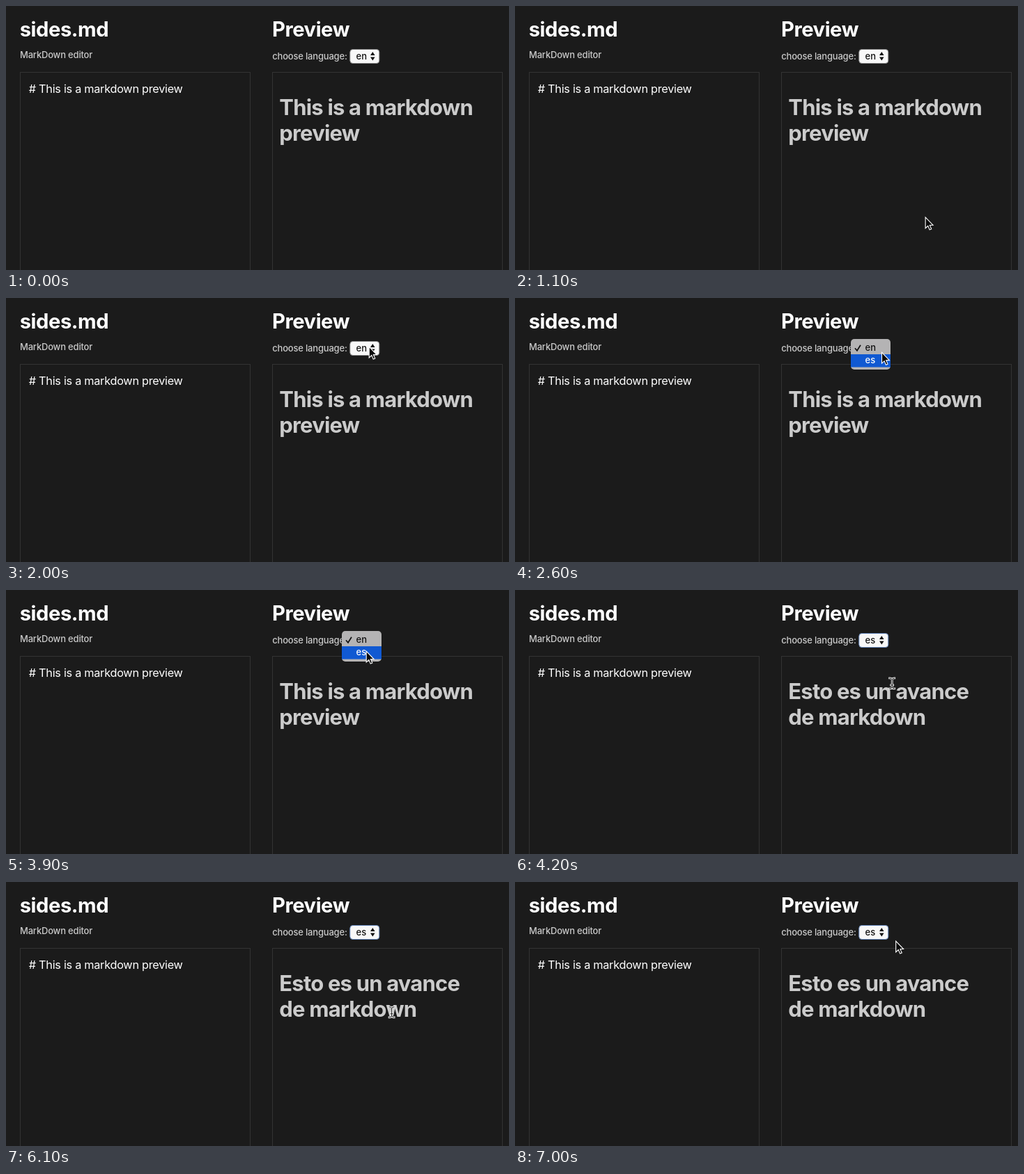
An HTML page for the animation above (7100 ms loop, 722 by 380 pixels).

```html
<!DOCTYPE html>
<html lang="en">
<head>
<meta charset="utf-8">
<title>Markdown preview</title>
<style>
html, body { margin: 0; width: 100%; height: 100%; overflow: hidden; background: #1b1b1b; }
svg { display: block; width: 722px; height: 380px; }
text { font-family: Inter, Roboto, sans-serif; font-optical-sizing: none; white-space: pre; }
.title { font-size: 29.2px; font-weight: 700; letter-spacing: -.45px; fill: #fff; }
.small { font-size: 13px; font-weight: 500; letter-spacing: -.19px; fill: #c9c9c9; }
.source { font-size: 16.3px; letter-spacing: -.29px; fill: #fff; }
.heading { font-size: 31px; font-weight: 700; letter-spacing: -.8px; fill: #cbcbcb; }
.option { font-size: 13px; font-weight: 500; letter-spacing: -.1px; fill: #111; }
.panel { fill: none; stroke: #333; }
</style>
</head>
<body>
<svg viewBox="0 0 722 380">
  <defs>
    <path id="stem" d="M-3.5-7.5Q0-7.5 0-5.5V5.5Q0 7.5-3.5 7.5M3.5-7.5Q0-7.5 0-5.5M0 5.5Q0 7.5 3.5 7.5M-1.5 2.5H1.5"/>
  </defs>
  <rect width="722" height="380" fill="#1b1b1b"/>

  <text class="title" x="19.7" y="44">sides.md</text>
  <text class="small" x="20" y="75">MarkDown editor</text>
  <rect class="panel" x="20.5" y="95.5" width="330" height="300"/>
  <text class="source" x="32.8" y="125"># This is a markdown preview</text>

  <text class="title" x="382" y="44">Preview</text>
  <text class="small" x="382.2" y="77">choose language:</text>
  <rect class="panel" x="382.5" y="95.5" width="330" height="300"/>
  <text class="heading" id="line1" x="392.3" y="157"></text>
  <text class="heading" id="line2" x="392.3" y="194"></text>

  <rect id="box" x="493.8" y="62.5" width="42" height="20" rx="4" fill="#f8f8f8"/>
  <text class="option" id="value" x="502.6" y="77"></text>
  <path d="M523 71l3.3-5 3.3 5zM523 73.6l3.3 5 3.3-5z" fill="#111"/>

  <g id="menu">
    <rect x="481.5" y="59.5" width="58" height="44" rx="5" fill="#000" opacity=".35"/>
    <rect x="482" y="59" width="57" height="44" rx="5" fill="#b4b3b4"/>
    <rect id="hover" x="482" width="57" height="18.5" fill="#1059d2"/>
    <path id="check" d="M488 72.2l3 3.6 5-8" fill="none" stroke-width="1.7"/>
    <text class="option" id="en" x="502.6" y="76">en</text>
    <text class="option" id="es" x="502.6" y="94">es</text>
  </g>

  <g id="pointer">
    <path id="arrow" transform="translate(-.8 -.3)" d="M.5.5V16.2L4.1 12.8 6.5 18.4 9.1 17.3 6.7 11.8H11.4Z" fill="#0a0a0a" stroke="#fff" stroke-width="1.1"/>
    <g id="beam" fill="none" stroke-linecap="square">
      <use href="#stem" stroke="#eee" stroke-width="2.8"/>
      <use href="#stem" stroke="#222"/>
    </g>
  </g>
</svg>
<script>
const LOOP = 7100, STEP = 100;
const ENTER = 700, OPEN = 2200, HOVER_ES = 2600, PICK = 4100;
const HEADINGS = {
  en: ["This is a markdown", "preview"],
  es: ["Esto es un avance", "de markdown"]
};
const HOME = [605, 370];
// Each gesture is a Bezier curve that begins where the last one ended.
const GESTURES = [
  { from: ENTER, to: 2000, bend: [[590, 405], [572, 0]], end: [521.5, 70] },
  { from: 2300, to: 3000, bend: [[530, 74], [528, 86]], end: [517.5, 88] },
  { from: 3900, to: 4300, bend: [[518, 88], [533, 78]], end: [558, 208] },
  { from: 4400, to: 4500, bend: [[558, 208], [562, 225]], end: [562, 225] },
  { from: 5700, to: 7000, bend: [[560, 232], [526, 38]], end: [547, 85] }
];
const $ = id => document.getElementById(id);
const show = (id, on) => $(id).setAttribute("display", on ? "inline" : "none");

function bezier(a, b, c, d, k) {
  const j = 1 - k;
  return j * j * j * a + 3 * j * j * k * b + 3 * j * k * k * c + k * k * k * d;
}

function pointAt(t) {
  let pos = HOME;
  for (const { from, to, bend: [b, c], end } of GESTURES) {
    if (t < from) break;
    const a = pos, k = Math.min(1, (t - from) / (to - from));
    pos = a.map((v, i) => bezier(v, b[i], c[i], end[i], k));
  }
  return pos;
}

function draw(time) {
  const t = Math.floor((time % LOOP) / STEP) * STEP;
  const lang = t < PICK ? "en" : "es";
  $("line1").textContent = HEADINGS[lang][0];
  $("line2").textContent = HEADINGS[lang][1];
  $("value").textContent = lang;
  $("box").setAttribute("stroke", lang === "en" ? "#8a8a8a" : "#6788bd");

  show("menu", t >= OPEN && t < PICK);
  const onEs = t >= HOVER_ES;
  $("hover").setAttribute("y", onEs ? 81 : 62.5);
  $("en").style.fill = onEs ? "#111" : "#fff";
  $("es").style.fill = onEs ? "#fff" : "#111";
  $("check").setAttribute("stroke", onEs ? "#111" : "#fff");

  const [x, y] = pointAt(t);
  const overText = y > 128 && y < 203;
  show("pointer", t >= ENTER);
  show("arrow", !overText);
  show("beam", overText);
  $("pointer").setAttribute("transform", `translate(${x} ${y})`);
}

function tick() {
  draw(performance.now());
  requestAnimationFrame(tick);
}
tick();
</script>
</body>
</html>
```
